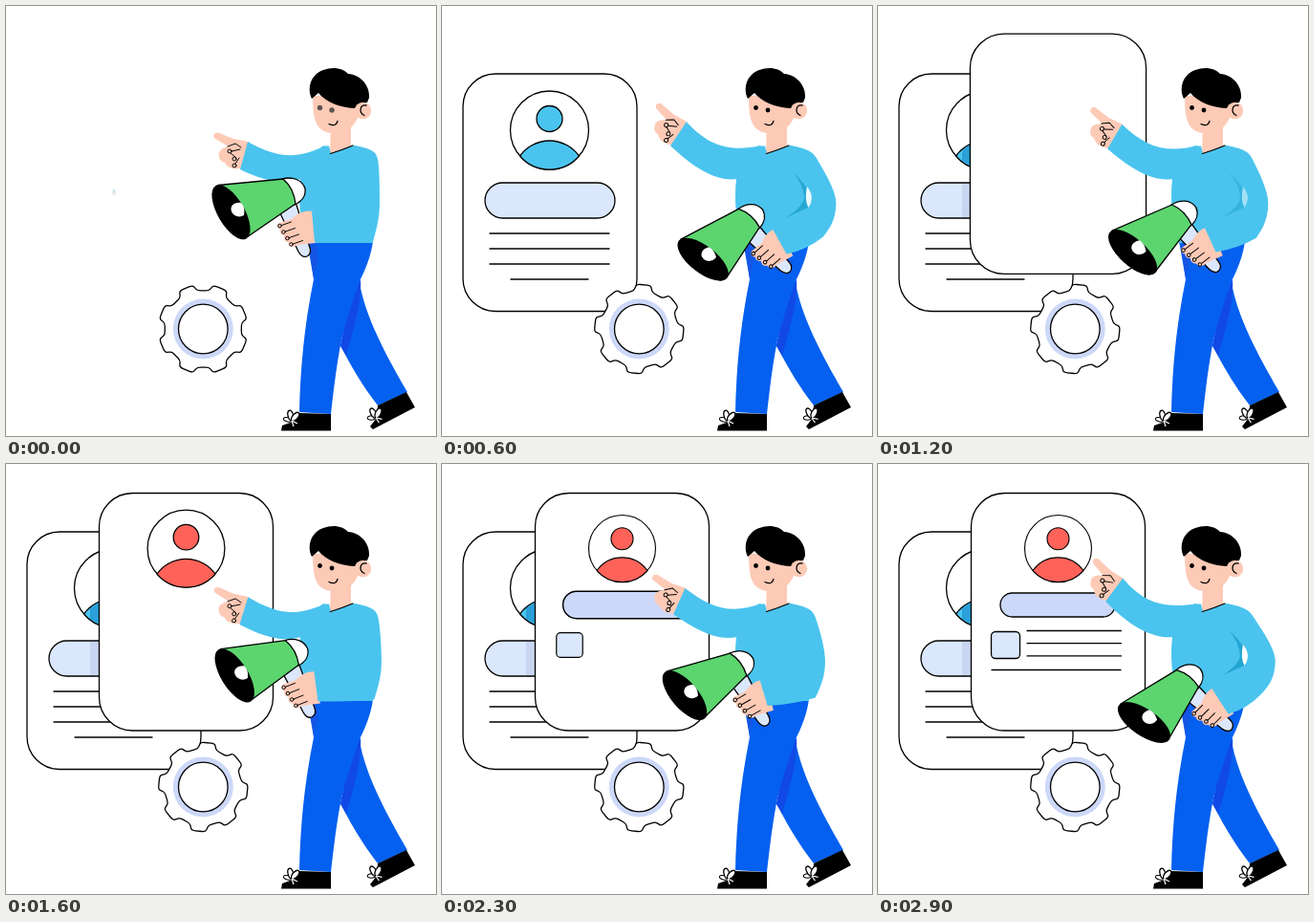
Recreate the animation shown at these times as an HTML page. Size 450 by 450 pixels, loop 3000 ms.

```html
<!DOCTYPE html>
<html lang="en">
<head>
<meta charset="utf-8">
<title>Announcing profile cards</title>
<style>
html, body { margin: 0; width: 100%; height: 100%; overflow: hidden; background: #fff; }
svg { display: block; width: 100vw; height: 100vh; }
.o { stroke: #000; stroke-width: 1.3; stroke-linecap: round; stroke-linejoin: round; }
.thin { stroke-width: .95; }
.n { fill: none; }
.w { fill: #fff; }
.skin { fill: #fdcab6; }
.shirt { fill: #4ac4ee; }
.pants { fill: #0560f0; }
.pale { fill: #dbe7fc; }
</style>
</head>
<body>
<svg viewBox="0 0 450 450">
  <defs>
    <g id="avatar">
      <circle r="41" class="w o"/>
      <circle cy="-12" r="13.5" fill="currentColor" class="o"/>
      <path d="M-31 27A38 38 0 0 1 31 27A41 41 0 0 1-31 27Z" fill="currentColor" class="o"/>
    </g>
    <ellipse id="loop" cy="-5.5" rx="2.8" ry="5.5" class="w o"/>
    <g id="bow">
      <use href="#loop" transform="rotate(-75) scale(.8)"/>
      <use href="#loop" transform="rotate(-12)"/>
      <use href="#loop" transform="rotate(42)"/>
      <path d="M0 0L6 3M0 0L2 6" stroke="#fff" stroke-width="1.2"/>
    </g>
    <g id="finger" class="o n thin"><circle r="1.8"/><path d="M2-.5L12-4"/></g>
  </defs>

  <g id="card1">
    <rect x="22" y="71" width="182" height="248.500" rx="34" class="w o"/>
    <use href="#avatar" x="112.500" y="130" color="#4ac4ee"/>
    <rect x="45" y="185" width="136" height="37" rx="18.500" class="pale o"/>
    <path class="o n" d="M50 238H175M50 254H175M50 270H175M72 286H153"/>
    <g id="shade">
      <path d="M88 151L97 145V167L88 162Z" fill="#2a9fd8"/>
      <path d="M88 186H97V221H88Z" fill="#c9d5f0"/>
    </g>
  </g>
  <rect id="card2" x="97.500" y="30.500" width="182" height="248.500" rx="35" class="w o"/>
  <g id="photo"><use href="#avatar" color="#ff6259" transform="translate(188.5 88.5) scale(.853)"/></g>
  <rect id="button" x="128" y="135" width="120" height="25" rx="12.500" fill="#cbd8f9" class="o"/>
  <rect id="tile" x="118.500" y="175.500" width="30" height="28" rx="4.500" class="pale o"/>
  <path id="rows" class="o n"/>

  <g transform="translate(206.3 338)">
    <path id="gear" class="w o"/>
    <circle r="31.500" fill="#cdd8f8"/>
    <circle r="25.800" class="w o"/>
  </g>

  <path class="pants" d="M350 355L369 285C375 320 390 352 420 404L389 418C372 396 360 375 350 355Z"/>
  <path fill="#1149e6" d="M350 356L358 312L371 286C373 310 362 345 356 366Z"/>
  <path class="pants" d="M315 246H384C382 262 376 276 370 288C362 312 354 335 350 355C345 382 343 402 340 427L307 425C308 380 312 335 322 286Z"/>
  <path fill="#1555e4" d="M317 249H324L327 262L322 285Z"/>
  <path d="M389 418L419 404L428 420L384 443L381 440L388 431Z"/>
  <path d="M307 426L340 427V444.500H288L289 439L303 434Z"/>
  <use href="#bow" transform="translate(299 434)"/>
  <use href="#bow" transform="translate(387 431) rotate(-15)"/>

  <g class="skin">
    <path d="M340 122L361 118V147L339 155Z"/>
    <path d="M321 94C321 114 323 124 330 129C337 135 351 135 360 128C367 122 370 114 372 104L362 92Z"/>
  </g>
  <path d="M320 97C315 87 318 72 332 67C342 63 353 65 358 71C371 72 381 83 380 96L378 101C373 101 370 107 364 107C350 106 335 101 327 91Z"/>
  <circle class="skin" cx="373.500" cy="109.500" r="8.700"/>
  <path class="o n" d="M377 104C370 103 369 112 375 114.500"/>
  <g id="eyes"><circle cx="328.500" cy="106.500"/><circle cx="341" cy="109"/></g>
  <path class="o n" d="M338 123.500Q345 127 347 120.500"/>

  <g id="point">
    <path class="skin" d="M254 142L238 139L222 132.500C217 132 216 137 219 139L233 147C226 148 221 153 223 157C223 162 227 163 229 164C232 170 239 171 246 170Z"/>
    <path class="o n thin" d="M232 147L240 144L246 148M236 152L245 150M235 154L240 158M240 165L244 159"/>
    <g class="o n thin"><circle cx="234" cy="152" r="2"/><circle cx="239" cy="160" r="2"/><circle cx="239" cy="167" r="2"/></g>
  </g>
  <path id="sleeve" class="shirt"/>
  <path class="shirt" d="M331 146.500H338L340 154.500L364 146C376 148 384 151 386 160L382 188L384 248H315.500Q304 215 308 181Z"/>
  <path class="o n" d="M339.500 154.500Q351 151 363 146"/>

  <g id="horn">
    <path class="pale o" d="M285 213L306 257Q310 264 315 262Q320 259 318 253L303 205Z"/>
    <path class="w o" d="M289 181C300 178 310 182 313 191C314 199 309 205 302 208Z"/>
    <path fill="#5dd56f" class="o" d="M222 187.500L290 181C298 188 302 198 303 207L252 242Z"/>
    <ellipse cx="235.500" cy="215.700" rx="32" ry="14" transform="rotate(60 235.5 215.7)"/>
    <path class="w" d="M246 206C238 205 234 210 236 215C238 220 244 222 249 219C250 214 249 209 246 206Z"/>
    <path class="skin" d="M322 215C312 213 305 217 299 223L286 227C283 229 284 233 287 234C286 237 288 240 291 240C290 244 292 247 295 247C296 252 301 253 305 250L324 248Z"/>
    <g id="fingers"></g>
  </g>
  <path id="arm" class="shirt"/>
  <g id="fold">
    <path fill="#22a5d3" d="M367 174Q379 184 384 195L383 211L359 222Q377 211 379 201Q378 186 367 174Z"/>
    <path class="w" d="M382 189Q391 200 383.500 211Q379 203 382 189Z"/>
  </g>
</svg>
<script>
const LOOP = 3000, STEP = 100, RAD = Math.PI / 180;
const $ = id => document.getElementById(id);
const set = (id, name, v) => $(id).setAttribute(name, v);
const mix = (a, b, k) => a + (b - a) * k;
const unit = x => Math.max(0, Math.min(1, x));
const smooth = x => { x = unit(x); return x * x * (3 - 2 * x); };

// Closed outline with corners rounded by a share of each edge.
function rounded(pts, share) {
  const toward = (a, b) => `${mix(a[0], b[0], share)} ${mix(a[1], b[1], share)}`;
  return pts.map((p, i) => {
    const prev = pts.at(i - 1), next = pts[(i + 1) % pts.length];
    return `${i ? 'L' : 'M'}${toward(p, prev)}Q${p[0]} ${p[1]} ${toward(p, next)}`;
  }).join('') + 'Z';
}
function gearPath(teeth) {
  const pts = [];
  for (let i = 0; i < teeth * 4; i++) {
    const side = i % 4, high = side === 1 || side === 2;
    const a = (Math.floor(i / 4) * 360 / teeth + (side < 2 ? -1 : 1) * (high ? 9 : 14)) * RAD;
    const r = high ? 47 : 40.5;
    pts.push([r * Math.cos(a), r * Math.sin(a)]);
  }
  return rounded(pts, .28);
}
set('gear', 'd', gearPath(8));

for (let i = 0; i < 4; i++) {
  const f = document.createElementNS('http://www.w3.org/2000/svg', 'use');
  f.setAttribute('href', '#finger');
  f.setAttribute('transform', `translate(${286.5 + 4 * i} ${230 + 6.5 * i})`);
  $('fingers').append(f);
}

// Grow past full size, then settle.
function pop(t, start, end) {
  const peak = mix(start, end, .52);
  return t < peak ? 1.16 * smooth((t - start) / (peak - start))
                  : 1.16 - .16 * smooth((t - peak) / (end - peak));
}
function scaleAt(id, x, y, k) {
  set(id, 'transform', `translate(${x} ${y}) scale(${k}) translate(${-x} ${-y})`);
  $(id).style.display = k > 0 ? '' : 'none';
}
function row(y, x1, x2, t) {
  const k = smooth(t / 230);
  return k > 0 ? `M${x1} ${y}H${mix(x1, x2, k)}` : '';
}

function drawCards(t) {
  scaleAt('card1', 113, 195, pop(t, -30, 600));
  const size = pop(t, 620, 1250);
  scaleAt('card2', 188.5, 154.5, size);
  $('shade').style.display = size > .9 ? '' : 'none';
  scaleAt('photo', 188.5, 88.5, pop(t, 1290, 1910));
  scaleAt('button', 138, 148, pop(t, 1970, 2500));
  scaleAt('tile', 133.5, 189.5, pop(t, 2150, 2560));
  let d = row(215.5, 119, 254, t - 2660);
  for (let i = 0; i < 3; i++) d += row(174.5 + 13.2 * i, 156, 254.5, t - 2510 - 50 * i);
  set('rows', 'd', d);
}

// k: 0 with the arms raised forward, 1 with the megaphone lowered.
function drawArms(k) {
  const sag = 4 * k * (1 - k);
  const px = 249, py = 157, dx = -2 * k, dy = -25 * k - 3 * sag, turn = 21.5 * k;
  set('point', 'transform', `translate(${dx} ${dy}) rotate(${turn} ${px} ${py})`);
  const c = Math.cos(turn * RAD), s = Math.sin(turn * RAD);
  const at = (x, y) => `${px + dx + x * c - y * s} ${py + dy + x * s + y * c}`;
  set('sleeve', 'd', `M${at(4, -15)}C${at(33, 1)} ${303 - 4 * k} ${162 - 10 * k} 334 146
    L309 181C${288 - 3 * k} ${187 - 3 * k} ${at(21, 26)} ${at(-4, 14)}Z`);

  set('horn', 'transform',
    `translate(${43.5 * k + 3 * sag} ${23.5 * k + 4.5 * sag}) rotate(${-26 * k} 304 232)`);
  const out = 391 + 25 * k;
  set('arm', 'd', `M${320 + 29 * k} ${215 + 19 * k}L${345 + 20 * k} 215L364 146
    C378 149 387 150 ${389 + 4 * k} 160S${out} 192 ${out} 206
    C${out} 222 ${388 + 22 * k} 232 ${384 + 17 * k} ${247 - 6 * k}
    Q${355 + 32 * k} ${249 + 7 * k} ${323 + 44 * k} ${247 + 15 * k}Z`);
  set('fold', 'opacity', unit((k - .5) / .4));
}

function draw(t) {
  drawCards(t);
  set('gear', 'transform', `rotate(${mix(22.5, 6, smooth(t / 600))})`);
  const swing = x => .5 - .5 * Math.cos((x + 160) / 1000 * Math.PI);
  drawArms((swing(t) - swing(0)) / (1 - swing(0)));
  const soft = t % 2000 < 100;
  set('eyes', 'fill', soft ? '#5a5350' : '#000');
  for (const e of $('eyes').children) e.setAttribute('r', soft ? 2.7 : 2.4);
}

const begin = performance.now();
function tick() {
  const t = (performance.now() - begin) % LOOP;
  draw(Math.floor(t / STEP) * STEP);
  requestAnimationFrame(tick);
}
tick();
</script>
</body>
</html>
```
